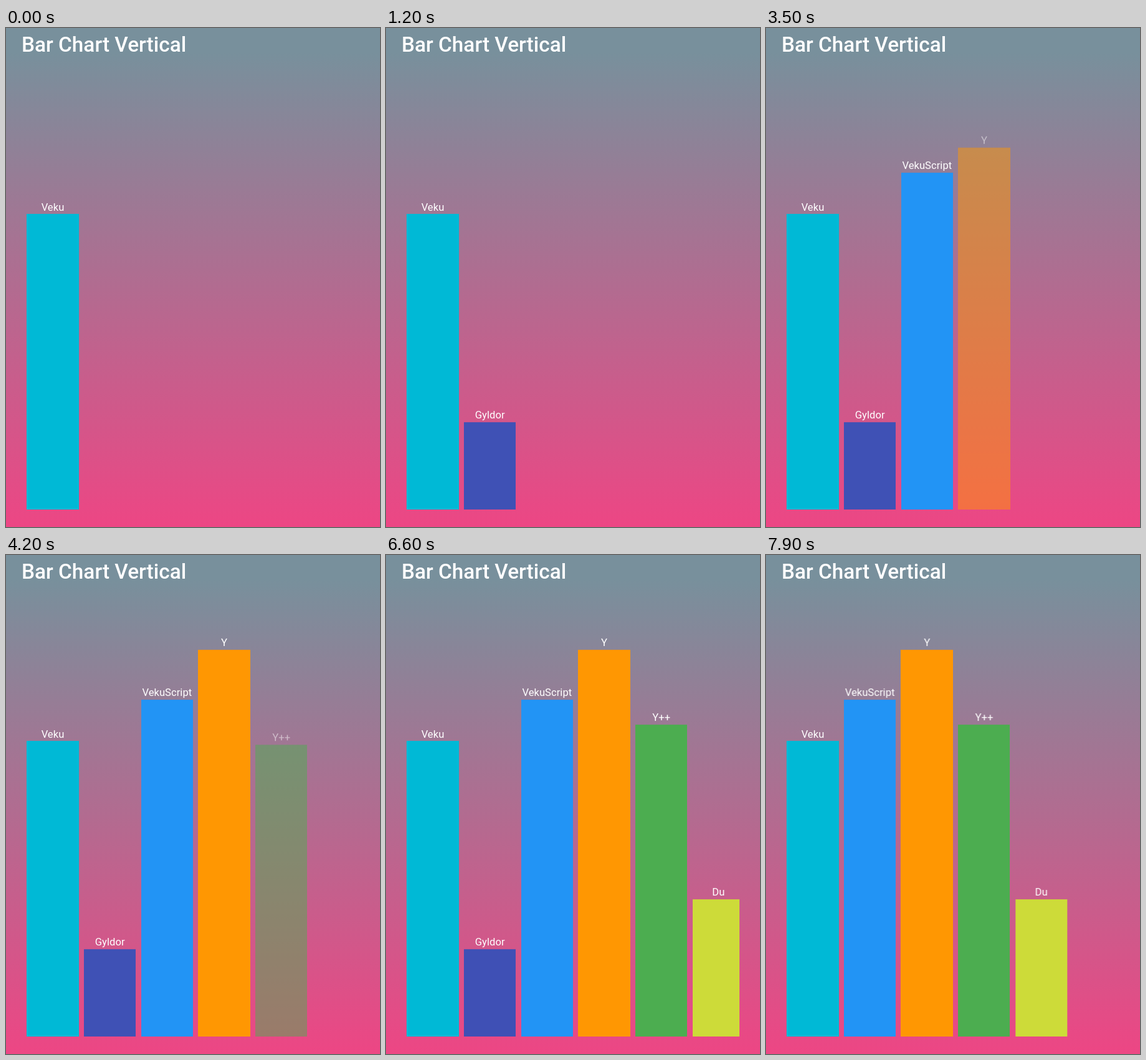
These frames come from a looping animation (600x800 px, 8 s). An HTML page:

```html
<!DOCTYPE html>
<html lang="en">
<head>
<meta charset="utf-8">
<title>Bar Chart Vertical</title>
<style>
  html, body {
    margin: 0;
    width: 100%;
    height: 100%;
    overflow: hidden;
  }
  body {
    position: relative;
    background: linear-gradient(#78909c 5%, #ed4684);
    color: #fff;
    font-family: Roboto, sans-serif;
  }
  h1 {
    position: absolute;
    left: 25px;
    top: 6.7px;
    margin: 0;
    font-size: 33.33px;
    font-weight: 500;
    line-height: 40px;
    white-space: nowrap;
  }
  .plot {
    position: absolute;
    left: 33.33px;
    top: 0;
    width: 533.33px;
    height: 771.67px;
    overflow: hidden;
  }
  .slot {
    position: absolute;
    left: calc(var(--i) * 91.667px);
    bottom: 0;
    width: 83.33px;
  }
  .label {
    font-size: 16.67px;
    line-height: 20.4px;
    text-align: center;
    white-space: nowrap;
  }
  .bar {
    height: var(--h);
    background: var(--c);
  }

  .item { animation: 8s linear infinite; }
  .item.b { animation-name: fade-b, rise-b; }
  .item.c { animation-name: fade-c, rise-c; }
  .item.d { animation-name: fade-d, rise-d; }
  .item.e { animation-name: fade-e, rise-e; }
  .item.f { animation-name: fade-f, rise-f; }
  .moves { animation: shift 8s ease-in-out infinite; }

  /* Opacity runs linearly while the rise decelerates. */
  @keyframes fade-b {
    0%, .625% { opacity: 0; }
    8.75%, 82.5% { opacity: 1; }
    86.875%, 100% { opacity: 0; }
  }
  @keyframes rise-b {
    0%, .625% { translate: 0 25%; animation-timing-function: cubic-bezier(.333, .667, .667, 1); }
    8.75%, 82.5% { translate: 0 0; animation-timing-function: cubic-bezier(.333, 0, .667, .333); }
    86.875%, 100% { translate: 0 25%; }
  }
  @keyframes fade-c {
    0%, 15% { opacity: 0; }
    23.75%, 100% { opacity: 1; }
  }
  @keyframes rise-c {
    0%, 15% { translate: 0 25%; animation-timing-function: cubic-bezier(.333, .667, .667, 1); }
    23.75%, 100% { translate: 0 0; }
  }
  @keyframes fade-d {
    0%, 38.75% { opacity: 0; }
    48.75%, 100% { opacity: 1; }
  }
  @keyframes rise-d {
    0%, 38.75% { translate: 0 25%; animation-timing-function: cubic-bezier(.333, .667, .667, 1); }
    48.75%, 100% { translate: 0 0; }
  }
  @keyframes fade-e {
    0%, 49.375% { opacity: 0; }
    55.625%, 100% { opacity: 1; }
  }
  @keyframes rise-e {
    0%, 49.375% { translate: 0 25%; animation-timing-function: cubic-bezier(.333, .667, .667, 1); }
    55.625%, 100% { translate: 0 0; }
  }
  @keyframes fade-f {
    0%, 63.75% { opacity: 0; }
    71.875%, 100% { opacity: 1; }
  }
  @keyframes rise-f {
    0%, 63.75% { translate: 0 25%; animation-timing-function: cubic-bezier(.333, .667, .667, 1); }
    71.875%, 100% { translate: 0 0; }
  }
  @keyframes shift {
    0%, 86.875% { translate: 0 0; }
    91.25%, 100% { translate: -91.667px 0; }
  }
</style>
</head>
<body>
<h1>Bar Chart Vertical</h1>
<div class="plot">
  <div class="slot" style="--i:0; --h:473.33px; --c:#00b9d6">
    <div class="item"><div class="label">Veku</div><div class="bar"></div></div>
  </div>
  <div class="slot" style="--i:1; --h:140px; --c:#3f51b5">
    <div class="item b"><div class="label">Gyldor</div><div class="bar"></div></div>
  </div>
  <div class="slot moves" style="--i:2; --h:540px; --c:#2294f5">
    <div class="item c"><div class="label">VekuScript</div><div class="bar"></div></div>
  </div>
  <div class="slot moves" style="--i:3; --h:620px; --c:#ff9702">
    <div class="item d"><div class="label">Y</div><div class="bar"></div></div>
  </div>
  <div class="slot moves" style="--i:4; --h:500px; --c:#4cad50">
    <div class="item e"><div class="label">Y++</div><div class="bar"></div></div>
  </div>
  <div class="slot moves" style="--i:5; --h:220px; --c:#cddb39">
    <div class="item f"><div class="label">Du</div><div class="bar"></div></div>
  </div>
</div>
</body>
</html>
```
